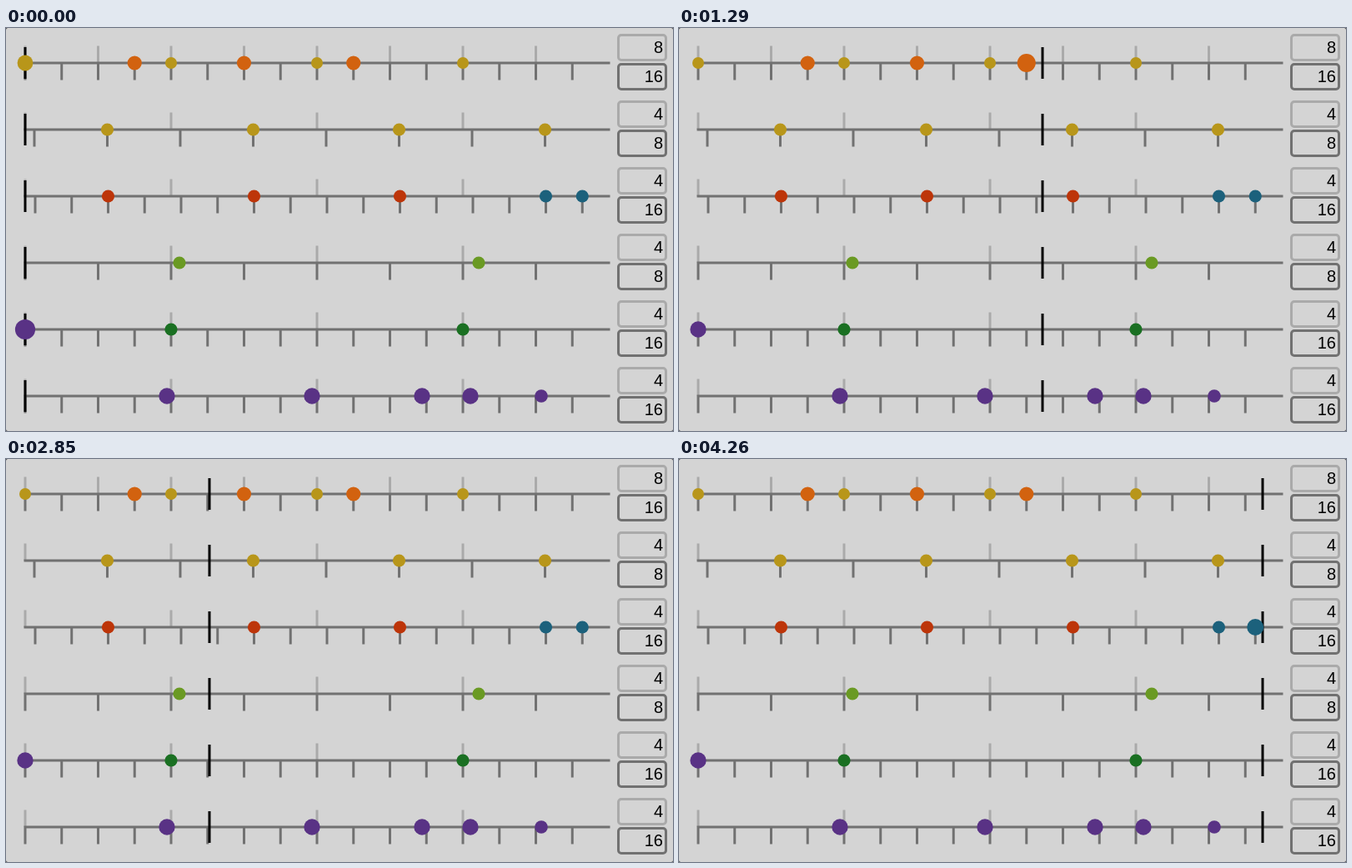
An HTML page for the animation above (4.29 s loop, 800 by 484 pixels).

```html
<!DOCTYPE html>
<html lang="en">
<head>
<meta charset="utf-8">
<title>Rhythm lanes</title>
<style>
  html, body { margin: 0; width: 100%; height: 100%; overflow: hidden; background: #444; }
  svg { display: block; width: 800px; height: 484px; }
  text { font: 20px "Liberation Sans", Arial, sans-serif; text-anchor: end; }
  path, rect.field { fill: none; stroke-width: 3; }
  .light { stroke: #aaa; }
  .dark { stroke: #717171; }
  .head { stroke: #000; }
</style>
</head>
<body>
<svg id="stage" viewBox="0 0 800 484">
  <rect width="800" height="484" rx="2.5" fill="#d4d4d4"/>
</svg>
<script>
const LOOP = 4290, STEP = 30, LEFT = 23, WIDTH = 700;
const REACH = 28.5, GROWTH = 2.4;
const gold = '#b8961a', orange = '#d2620f', red = '#bd3509', blue = '#1c617c',
      lime = '#6a9a23', green = '#1a7022', purple = '#593285';

// Dots are [x, radius, colour].
const lanes = [
  { beats: 8, steps: 16, shift: 0, dots: [
    [23, 7, gold], [154.25, 8.6, orange], [198, 7, gold], [285.5, 8.6, orange],
    [373, 7, gold], [416.75, 8.6, orange], [548, 7, gold]] },
  { beats: 4, steps: 8, shift: 11, dots:
    [121.5, 296.5, 471.5, 646.5].map(x => [x, 7.6, gold]) },
  { beats: 4, steps: 16, shift: 12, dots: [
    [122.5, 7.6, red], [297.5, 7.6, red], [472.5, 7.6, red],
    [647.5, 7.6, blue], [691.25, 7.6, blue]] },
  { beats: 4, steps: 8, shift: 0, dots: [[208, 7.6, lime], [567, 7.6, lime]] },
  { beats: 4, steps: 16, shift: 0, dots: [
    [23, 9.7, purple], [198, 7.6, green], [548, 7.6, green]] },
  { beats: 4, steps: 16, shift: 0, dots: [
    [193, 9.7, purple], [367, 9.7, purple], [499, 9.7, purple],
    [557, 9.7, purple], [642, 7.8, purple]] }
];

// [time, distance travelled] of the playhead over two bars
const travel = [[0, 0], [450, 146], [1290, 413], [2010, 647],
                [2850, 921], [3420, 1107.5], [4260, 1377], [4290, 1387]];

const stage = document.getElementById('stage');

function add(tag, attrs, parent = stage) {
  const el = document.createElementNS('http://www.w3.org/2000/svg', tag);
  for (const key in attrs) el.setAttribute(key, attrs[key]);
  return parent.appendChild(el);
}

function ticks(count, shift, length) {
  return Array.from({ length: count }, (_, i) =>
    `M${LEFT + shift + i * WIDTH / count} 0v${length}`).join('');
}

function field(y, kind, value, parent) {
  add('rect', { class: 'field ' + kind, x: 734.5, y, width: 57, height: 30, rx: 3.5 }, parent);
  add('text', { x: 788, y: y + 21.8 }, parent).textContent = value;
}

const heads = [], dots = [];
lanes.forEach((lane, i) => {
  const g = add('g', { transform: `translate(0 ${42 + 80 * i})` });
  add('path', { class: 'light', d: ticks(lane.beats, 0, -20.5) }, g);
  add('path', { class: 'dark', d: ticks(lane.steps, lane.shift, 20.5) + 'M21.5 0H724.5' }, g);
  heads.push(add('path', { class: 'head', d: 'M0 -19V19' }, g));
  for (const [x, r, fill] of lane.dots)
    dots.push({ x, r, el: add('circle', { cx: x, cy: 0, r, fill }, g) });
  field(-33.5, 'light', lane.beats, g);
  field(1.5, 'dark', lane.steps, g);
});

function distance(t) {
  const k = travel.findIndex(p => p[0] > t);
  const [t0, d0] = travel[k - 1], [t1, d1] = travel[k];
  return d0 + (d1 - d0) * (t - t0) / (t1 - t0);
}

function draw(now) {
  const t = Math.floor(now % LOOP / STEP) * STEP;
  const x = LEFT + distance(t) % WIDTH;
  heads.forEach(h => h.setAttribute('transform', `translate(${x} 0)`));
  for (const dot of dots)
    dot.el.setAttribute('r', dot.r + (Math.abs(dot.x - x) < REACH ? GROWTH : 0));
}

const start = performance.now();
function tick() {
  draw(performance.now() - start);
  requestAnimationFrame(tick);
}
tick();
</script>
</body>
</html>
```
